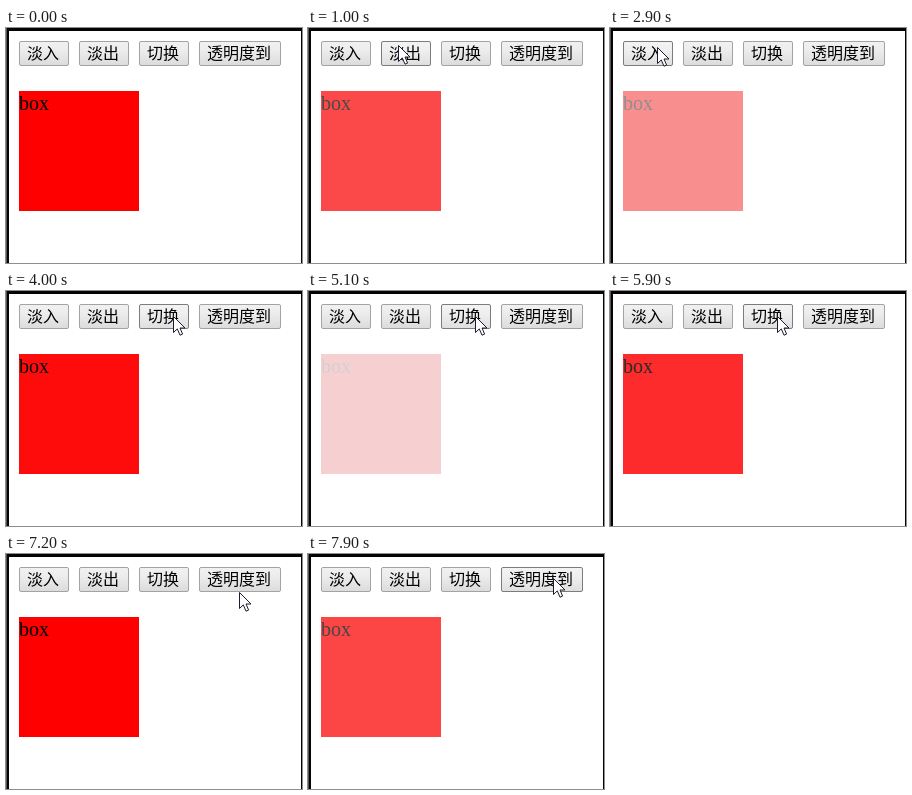
Animation of 296 by 235 pixels, one loop 8 s. Source, as an HTML page:

```html
<!DOCTYPE html>
<html lang="zh-CN">
<head>
<meta charset="utf-8">
<title>淡入淡出</title>
<style>
  html, body { margin: 0; width: 100%; height: 100%; overflow: hidden; background: #fff; }
  #stage { position: absolute; left: 0; top: 0; width: 296px; height: 235px; overflow: hidden; background: #fff; }
  #edge {
    position: absolute; inset: 0; border: solid #060206; border-width: 3px 1px 0 3px;
    box-shadow: inset 0 0 #000;
  }
  #edge::before { content: ""; position: absolute; left: -3px; top: -3px; width: 1px; height: 235px; background: #555; }
  #bar { position: absolute; left: 13px; top: 13px; display: flex; gap: 10px; }
  .btn {
    height: 25px; box-sizing: border-box; padding: 0 9px 0 7px;
    border: 1px solid #a3a3a3; border-radius: 2px;
    background: linear-gradient(#f1f1f1, #ececec 38%, #dcdcdc);
    font: 300 16px/21px "Noto Sans CJK SC", "Noto Sans CJK", sans-serif;
    white-space: nowrap; color: #000;
  }
  .btn.hover { border-color: #7c7c7c; background: linear-gradient(#f3f3f3, #efefef 38%, #dfdfdf); }
  .btn.down { background: linear-gradient(#e2e2e2, #e6e6e6 38%, #dadada); }
  #back { position: absolute; left: 13px; top: 63px; width: 120px; height: 120px; background: #f5f5f5; }
  #box {
    height: 100%; background: #f00; color: #000;
    font: 20px/25px "Liberation Serif", "Times New Roman", serif;
  }
  #cursor { position: absolute; left: 0; top: 0; overflow: visible; }
</style>
</head>
<body>
<div id="stage">
  <div id="edge"></div>
  <div id="bar">
    <div class="btn">淡入</div>
    <div class="btn">淡出</div>
    <div class="btn">切换</div>
    <div class="btn">透明度到</div>
  </div>
  <div id="back"><div id="box">box</div></div>
  <svg id="cursor" width="13" height="21">
    <path d="M.5 .5V16.5L4.3 12.9L7 19.2L9.6 18.1L7 12H12Z" fill="#fff" stroke="#1c1c30"/>
  </svg>
</div>
<script>
const LOOP = 8000, STEP = 100, FADE = 400, PRESS = 180;
const bar = document.getElementById('bar');
const back = document.getElementById('back');
const box = document.getElementById('box');
const cursor = document.getElementById('cursor');
const buttons = [...bar.children];

// The pointer rests between moves.
const entry = { at: 100, x: 234, y: 40 };
const moves = [
  { at: 100, ms: 100, x: 130, y: 48 },
  { at: 200, ms: 200, x: 91, y: 40 },
  { at: 400, ms: 300, x: 90, y: 17 },
  { at: 1900, ms: 700, x: 47, y: 19 },
  { at: 3100, ms: 600, x: 167, y: 25 },
  { at: 6900, ms: 300, x: 233, y: 38 },
  { at: 7200, ms: 200, x: 245, y: 24 }
];

// Each click toggles the box; the last one fades it halfway.
const clicks = [852, 2722, 3941, 5000, 5790, 6570, 7680];
const levelAfter = n => n === clicks.length ? 0.5 : (n + 1) % 2;

const lerp = (a, b, p) => a + (b - a) * p;
const progress = (t, start, ms) => Math.max(0, Math.min(1, (t - start) / ms));
const swing = p => 0.5 - Math.cos(Math.PI * p) / 2;

function pointerAt(t) {
  let { x, y } = entry;
  for (const m of moves) {
    const p = progress(t, m.at, m.ms);
    x = lerp(x, m.x, p);
    y = lerp(y, m.y, p);
  }
  return { x: Math.round(x), y: Math.round(y) };
}

function opacityAt(t) {
  const n = clicks.filter(c => c <= t).length;
  if (!n) return 1;
  return lerp(levelAfter(n - 1), levelAfter(n), swing(progress(t, clicks[n - 1], FADE)));
}

function draw(t) {
  const opacity = opacityAt(t);
  box.style.opacity = opacity;
  back.style.display = opacity > 0 ? '' : 'none';

  const shown = t >= entry.at;
  const tip = pointerAt(t);
  cursor.style.display = shown ? '' : 'none';
  cursor.style.transform = `translate(${tip.x}px, ${tip.y}px)`;

  const down = clicks.some(c => t >= c - PRESS && t < c);
  for (const el of buttons) {
    const dx = tip.x - bar.offsetLeft - el.offsetLeft;
    const dy = tip.y - bar.offsetTop;
    const over = shown && dx >= 0 && dx < el.offsetWidth && dy >= 0 && dy < el.offsetHeight;
    el.classList.toggle('hover', over);
    el.classList.toggle('down', over && down);
  }
}

const began = performance.now();
function tick() {
  const t = (performance.now() - began) % LOOP;
  draw(Math.floor(t / STEP) * STEP);
  requestAnimationFrame(tick);
}
tick();
</script>
</body>
</html>
```
